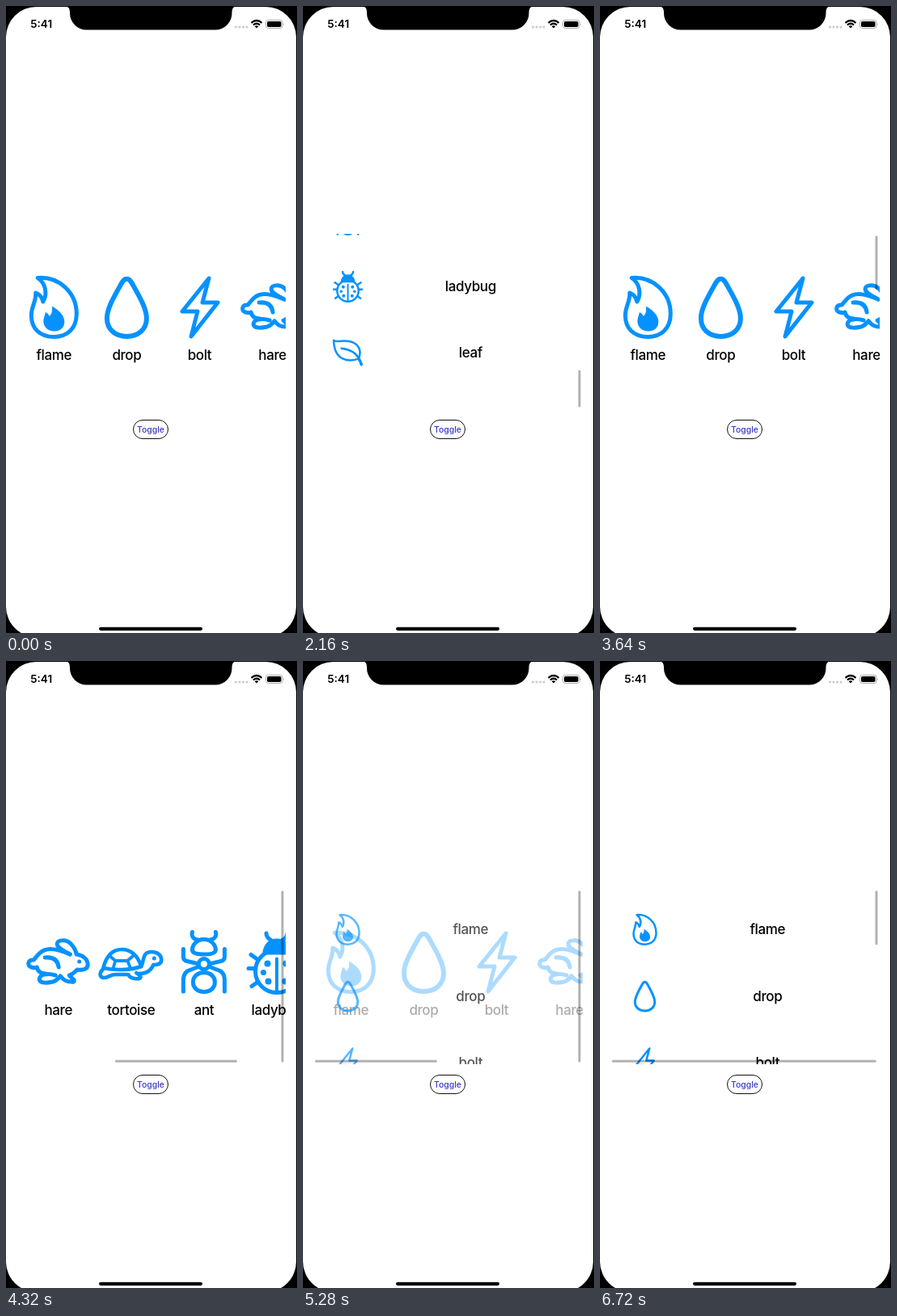
An HTML page that plays this animation: 360 by 776 pixels, repeating every 6.76 s.

```html
<!DOCTYPE html>
<html lang="en">
<head>
<meta charset="utf-8">
<title>Stack toggle</title>
<style>
  html, body { margin: 0; width: 100%; height: 100%; overflow: hidden; background: #000; }
  svg { display: block; width: 100%; height: 100%; }
  text { font-family: Inter, "Open Sans", sans-serif; text-anchor: middle; }
  .label { font-size: 17px; font-weight: 500; letter-spacing: -.38px; }
  .icon { fill: none; stroke: #0692fe; stroke-width: 5; stroke-linecap: round; stroke-linejoin: round; }
  .solid { fill: #0692fe; stroke: none; }
  .bar { stroke: #000; stroke-opacity: .3; stroke-width: 3; stroke-linecap: round; }
</style>
</head>
<body>
<svg viewBox="0 0 360 776">
  <defs>
    <clipPath id="view"><rect x="14" y="282" width="332" height="217"/></clipPath>

    <g id="flame" class="icon" transform="translate(-59.5 -372.5)">
      <path d="M39.500 336.500C65 334.500 87.500 354 87.500 381C87.500 399 76 409.500 59.500 409.500C42 409.500 31.500 399 31.500 383C31.500 372 37.500 366 37 355C42 357 45 361 46 366C52 356 49 343 39.500 336.500Z"/>
      <path class="solid" d="M57 371.500C66 376.500 72.500 383 72.500 391C72.500 398 67 402.500 60 402.500C52 402.500 46.500 397 46.500 390C46.500 386 48.500 383 49 379C52 380 53 382 54 384C57 381 58 377 57 371.500Z"/>
    </g>

    <g id="drop" class="icon" transform="translate(-149.5 -372.5)">
      <path stroke-width="6" d="M149.500 337.800C146.500 337.800 145 339.500 142 345C133 361 125 375 125 386.500C125 400 135 409 149.500 409C164 409 174 400 174 386.500C174 375 166 361 157 345C154 339.500 152.500 337.800 149.500 337.800Z"/>
    </g>

    <g id="bolt" class="icon" transform="translate(-239.5 -372.5)">
      <path d="M251 337L218 378H237L229 409L262 367H243Z"/>
    </g>

    <g id="hare" class="icon" transform="translate(-63.5 -372.5)">
      <path d="M78 363C72 359 62 356 62 350C62 345 73 344 79 350C83 354 85 358 86 363C94 364 100 369 100 376C100 381 95 383 87 382C83 386 80 388 77 389L81 393C84 395 84 398 80 397C72 397 70 394 66 390"/>
      <path d="M78 363C66 358 50 352 40 362C36 366 34 369 33 370C25 369 25 378 30 379C34 380 36 380 37 379C38 384 42 387 48 387"/>
      <path d="M60 389C50 386 40 388 40 394C41 400 52 398 57 397C60 396 63 394 66 390M47 367C58 366 63 371 64 379"/>
      <circle class="solid" cx="89.500" cy="372" r="2.500"/>
    </g>

    <g id="tortoise" class="icon" transform="translate(-153.5 -372.5)">
      <path stroke-width="4.600" d="M119 380C123 364 131 357 142 357C155 357 162 366 166 378C152 383 133 383 119 380Z"/>
      <path stroke-width="3.800" d="M127 365L134 371H149L157 364M134 371L131 381M149 371L153 381"/>
      <path stroke-width="4.600" d="M166 378C170 370 167 360 179 360C187 360 191 365 191 370C191 375 186 376 181 376C177 385 171 387 162 387M119 381C113 387 115 392 120 392C126 392 127 388 134 388H150C152 394 164 394 165 392C166 390 163 388 160 386"/>
      <circle class="solid" cx="182" cy="368" r="2.500"/>
    </g>

    <g id="antSide"><path d="M-14.500 -37C-16 -32 -13 -28 -7.500 -27.500M-25.500 -16V-6Q-25.500 -2 -21 -1L-8 2M-7 6L-20 11Q-25 14 -25.500 21V36.500"/></g>
    <g id="ant" class="icon">
      <use href="#antSide"/><use href="#antSide" transform="scale(-1 1)"/>
      <path d="M0 -28C-10 -28 -14.500 -20 -14.500 -15C-14.500 -11 -10 -9.500 0 -9.500C10 -9.500 14.500 -11 14.500 -15C14.500 -20 10 -28 0 -28Z"/>
      <circle cy="2.500" r="6.500"/>
      <path d="M0 13C-8 13 -13.500 18 -13.500 25C-13.500 32 -8 37 0 37C8 37 13.500 32 13.500 25C13.500 18 8 13 0 13Z"/>
    </g>

    <g id="bugSide">
      <path d="M-13 -35.500C-13 -31 -11 -29 -7 -27M-32 -9L-25 -4M-35 8H-27M-31 30L-24 25"/>
      <g class="solid"><circle cx="-11.500" cy="2" r="4"/><circle cx="-16.500" cy="13" r="3.600"/><circle cx="-10.500" cy="24" r="4"/></g>
    </g>
    <g id="ladybug" class="icon">
      <use href="#bugSide"/><use href="#bugSide" transform="scale(-1 1)"/>
      <circle cy="11.500" r="26.500"/>
      <path class="solid" d="M-18 -9C-17 -23 -9 -29 0 -29C9 -29 17 -23 18 -9Z"/>
      <path stroke-width="4" d="M0 -4V37"/>
    </g>

    <g id="leaf" class="icon">
      <path d="M-35 -31C-28 -24 -2 -36 16 -24C30 -15 33 -2 27 14C2 24 -34 20 -35 -31Z"/>
      <path d="M-16 -11C2 -9 18 -4 27 14"/>
      <path stroke-width="7" d="M27 14C30 19 32 24 33.500 29"/>
    </g>
  </defs>

  <rect width="360" height="776"/>
  <rect y="1" width="359" height="780" rx="37.500" fill="#fff"/>
  <path d="M73 0Q79 1 79 7V9A20.500 20.500 0 0 0 99.500 29.500H259A20.500 20.500 0 0 0 279.500 9V7Q279.500 1 285.500 0Z"/>

  <text x="43.700" y="27.300" font-size="13.500" font-weight="600">5:41</text>
  <g fill="#ccc">
    <circle cx="284.500" cy="26" r="1.600"/><circle cx="289" cy="26" r="1.600"/>
    <circle cx="293.500" cy="26" r="1.600"/><circle cx="298" cy="26" r="1.600"/>
  </g>
  <g fill="none" stroke="#000" stroke-width="2.200">
    <path d="M303.500 20.800Q310 15.200 316.500 20.800M305.900 23.500Q310 20 314.100 23.500"/>
    <path d="M307.700 25.200Q310 23.400 312.300 25.200L310 27.600Z" fill="#000" stroke="none"/>
  </g>
  <rect x="321.500" y="17.500" width="20.500" height="10" rx="3" fill="none" stroke="#aaa"/>
  <rect x="323" y="19" width="17.500" height="7" rx="1.700"/>
  <path d="M343 21Q344.500 22.500 343 24.500Z" fill="#aaa"/>

  <g clip-path="url(#view)"><g id="row"></g><g id="column"></g></g>
  <line id="vBar" class="bar" x1="342" x2="342"/>
  <line id="hBar" class="bar" y1="495.200" y2="495.200"/>

  <rect x="157.500" y="512.500" width="43" height="23" rx="11.500" fill="#fff" stroke="#111"/>
  <text x="179" y="528" font-size="10.400" font-weight="500" fill="#3838c8">Toggle</text>
  <rect x="115" y="768.700" width="128" height="4.300" rx="2.150"/>
</svg>

<script>
const LOOP = 6760;
const NAMES = ["flame", "drop", "bolt", "hare", "tortoise", "ant", "ladybug", "leaf"];
const ROW_STEP = 90.1, COL_STEP = 82.5;
const ROW_MAX = 388, COL_MAX = 459.5;

// [time, offset] points of each scroll gesture
const ROW_SCROLL = [[3640, 0], [3760, 60], [3900, 300], [4020, 402], [4140, 390], [4220, 366],
  [4320, 266], [4480, 70], [4620, -12], [4690, -20], [4760, -15], [4960, -5], [5160, 0]];
const COL_SCROLL = [[1540, 0], [1680, 50], [1860, 270], [2020, 440], [2110, 484], [2160, 480.5],
  [2300, 464], [2420, 440], [2600, 210], [2760, 60], [2900, 14], [3080, 0],
  [5540, 0], [5640, 110], [5780, 430], [5860, 497], [5880, 495.5], [6000, 472], [6080, 425],
  [6220, 130], [6340, -14], [6400, -17], [6480, -9], [6700, 0]];

const $ = id => document.getElementById(id);
const clamp = (x, lo = 0, hi = 1) => Math.min(hi, Math.max(lo, x));
const smooth = x => { x = clamp(x); return x * x * (3 - 2 * x); };

// Cubic through the points, flat at every turning point
function follow(pts, t) {
  const last = pts.length - 1;
  if (t <= pts[0][0]) return pts[0][1];
  if (t >= pts[last][0]) return pts[last][1];
  const slope = i => (pts[i + 1][1] - pts[i][1]) / (pts[i + 1][0] - pts[i][0]);
  const tangent = i => {
    if (i === 0 || i === last) return 0;
    const a = slope(i - 1), b = slope(i);
    return a * b <= 0 ? 0 : 2 * a * b / (a + b);
  };
  const i = pts.findIndex(p => p[0] > t) - 1;
  const h = pts[i + 1][0] - pts[i][0], u = (t - pts[i][0]) / h;
  const w = u * u * (3 - 2 * u);
  return pts[i][1] * (1 - w) + pts[i + 1][1] * w
    + h * u * (1 - u) * (tangent(i) * (1 - u) - tangent(i + 1) * u);
}

const item = (name, icon, label) =>
  `<g transform="${icon}"><use href="#${name}"/></g><text class="label" ${label}>${name}</text>`;

$("row").innerHTML = NAMES.map((name, i) => {
  const x = 59.3 + i * ROW_STEP;
  return item(name, `translate(${x} 372.5)`, `x="${x}" y="438.3"`);
}).join("");

$("column").innerHTML = NAMES.map((name, i) => {
  const y = 332.2 + i * COL_STEP;
  return item(name, `translate(55.5 ${y}) scale(.5)`, `x="207.3" y="${y + 5.9}"`);
}).join("");

// Scroll indicator that shrinks against its end when pulled too far
function setBar(el, axis, start, track, size, offset, max) {
  const over = Math.max(0, -offset, offset - max);
  const length = size - over;
  const from = start + clamp(offset / max) * (track - size) + (offset > max ? over : 0);
  el.setAttribute(axis + 1, from + 1.5);
  el.setAttribute(axis + 2, from + length - 1.5);
}

function show(el, alpha) {
  el.setAttribute("opacity", alpha);
}

function draw(t) {
  const rowX = follow(ROW_SCROLL, t), colY = follow(COL_SCROLL, t);
  const mix = smooth((t - 460) / 540) - smooth((t - 2900) / 520) + smooth((t - 4960) / 520);

  $("row").setAttribute("transform", `translate(${-rowX} 0)`);
  $("column").setAttribute("transform", `translate(0 ${-colY})`);
  show($("row"), 1 - mix);
  show($("column"), mix);

  const sideways = t > 3660 && t < 5540;
  setBar($("vBar"), "y", 284.3, 212.2, sideways ? 212.2 : 67, sideways ? 0 : colY, COL_MAX);
  setBar($("hBar"), "x", 14.8, 327, t < 5540 ? 151 : 327, t < 5540 ? rowX : 0, ROW_MAX);
  show($("vBar"), clamp((t - 1540) / 80));
  show($("hBar"), clamp((t - 3650) / 80));
}

const began = performance.now();
function tick() {
  draw((performance.now() - began) % LOOP);
  requestAnimationFrame(tick);
}
tick();
</script>
</body>
</html>
```
